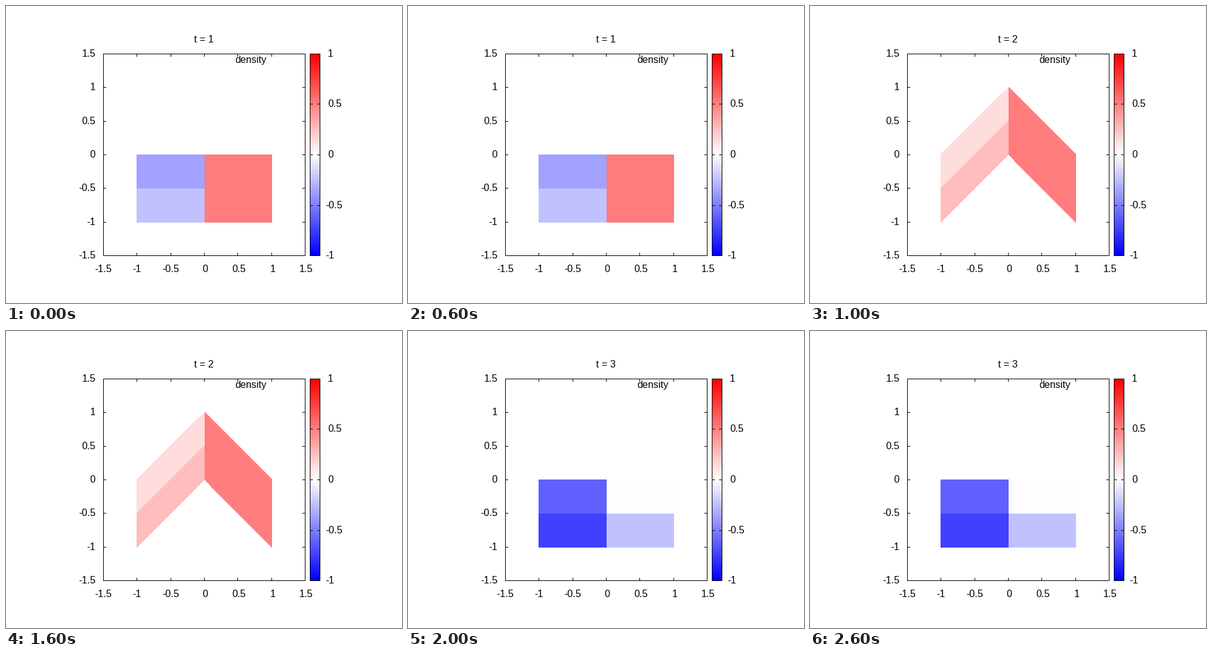
A matplotlib script for the animation above (3000 ms loop, 640 by 480 pixels).

```python
import math

import matplotlib.pyplot as plt
from matplotlib.animation import FuncAnimation
from matplotlib.patches import Polygon, Rectangle

W, H, DPI = 640, 480, 100
LEFT, TOP, SPAN = 157, 77, 326
BAR_LEFT, BAR_WIDTH = 491, 16
TICK = 5
LEVELS = 128

# Per step: lift of the middle, then (upper left, lower left, upper right, lower right)
STEPS = [
    (0, (-0.375, -0.25, 0.5, 0.5)),
    (1, (0.125, 0.25, 0.5, 0.5)),
    (0, (-0.625, -0.75, 0.0, -0.25)),
]
CELLS = [(-1, -0.5), (-1, -1), (0, -0.5), (0, -1)]

plt.rcParams["font.family"] = "Liberation Sans"
fig = plt.figure(figsize=(W / DPI, H / DPI), dpi=DPI, facecolor="white")
ax = fig.add_axes([0, 0, 1, 1])
ax.set_xlim(0, W)
ax.set_ylim(H, 0)
ax.axis("off")


def palette(level):
    g = level / (LEVELS - 1)
    if g < 0.5:
        return (2 * g, 2 * g, 1)
    return (1, 2 - 2 * g, 2 - 2 * g)


def shade(value):
    return palette(min(int((value + 1) / 2 * LEVELS), LEVELS - 1))


def box(x, y, w, h, color="black"):
    ax.add_patch(Rectangle((x, y), w, h, color=color, lw=0,
                           antialiased=False, zorder=2))


def frame(x, y, w, h):
    box(x, y, w + 1, 1)
    box(x, y + h, w + 1, 1)
    box(x, y, 1, h + 1)
    box(x + w, y, 1, h + 1)


def label(x, y, text, ha):
    return ax.text(x, y, text, ha=ha, va="baseline", size=16 * 72 / DPI)


def draw_axes():
    frame(LEFT, TOP, SPAN, SPAN)
    right, bottom = LEFT + SPAN, TOP + SPAN
    for i in range(7):
        step = SPAN * i / 6
        x, y = round(LEFT + step), round(bottom - step)
        value = -1.5 + i / 2
        text = f"{value:g}"
        box(x, TOP, 1, TICK)
        box(x, bottom - TICK + 1, 1, TICK)
        box(LEFT, y, TICK, 1)
        box(right - TICK + 1, y, TICK, 1)
        label(x + (2.2 if value >= 0 else 0), 430, text, "center")
        label(144.5, y + 5, text, "right")
    label(421.5, 92, "density", "right")


def draw_bar():
    edges = [round(TOP + SPAN * (1 - i / LEVELS)) for i in range(LEVELS + 1)]
    for i, (low, high) in enumerate(zip(edges, edges[1:])):
        box(BAR_LEFT, high, BAR_WIDTH, low - high, palette(i))
    frame(BAR_LEFT, TOP, BAR_WIDTH, SPAN)
    for i in range(5):
        y = round(TOP + SPAN * (1 - i / 4))
        value = -1 + i / 2
        box(BAR_LEFT, y, TICK, 1)
        box(BAR_LEFT + BAR_WIDTH - TICK + 1, y, TICK, 1)
        label(516 if value < 0 else 520, y + 5, f"{value:g}", "left")


def to_pixels(x, y, lift):
    y += lift * (1 - abs(x))
    return math.ceil(320.5 + 109.5 * x), math.floor(240.5 - 109.5 * y)


def update(n):
    lift, values = STEPS[n]
    for patch, (x, y), value in zip(cells, CELLS, values):
        corners = [(x, y), (x + 1, y), (x + 1, y + 0.5), (x, y + 0.5)]
        patch.set_xy([to_pixels(cx, cy, lift) for cx, cy in corners])
        patch.set_facecolor(shade(value))
    title.set_text(f"t = {n + 1}")
    return [*cells, title]


cells = [ax.add_patch(Polygon([(0, 0)] * 4, lw=0, antialiased=False, zorder=1))
         for _ in CELLS]
title = label(319.5, 59, "", "center")
draw_axes()
draw_bar()
update(0)

anim = FuncAnimation(fig, update, frames=len(STEPS), interval=1000,
                     repeat=True, repeat_delay=0)
plt.show()
```
